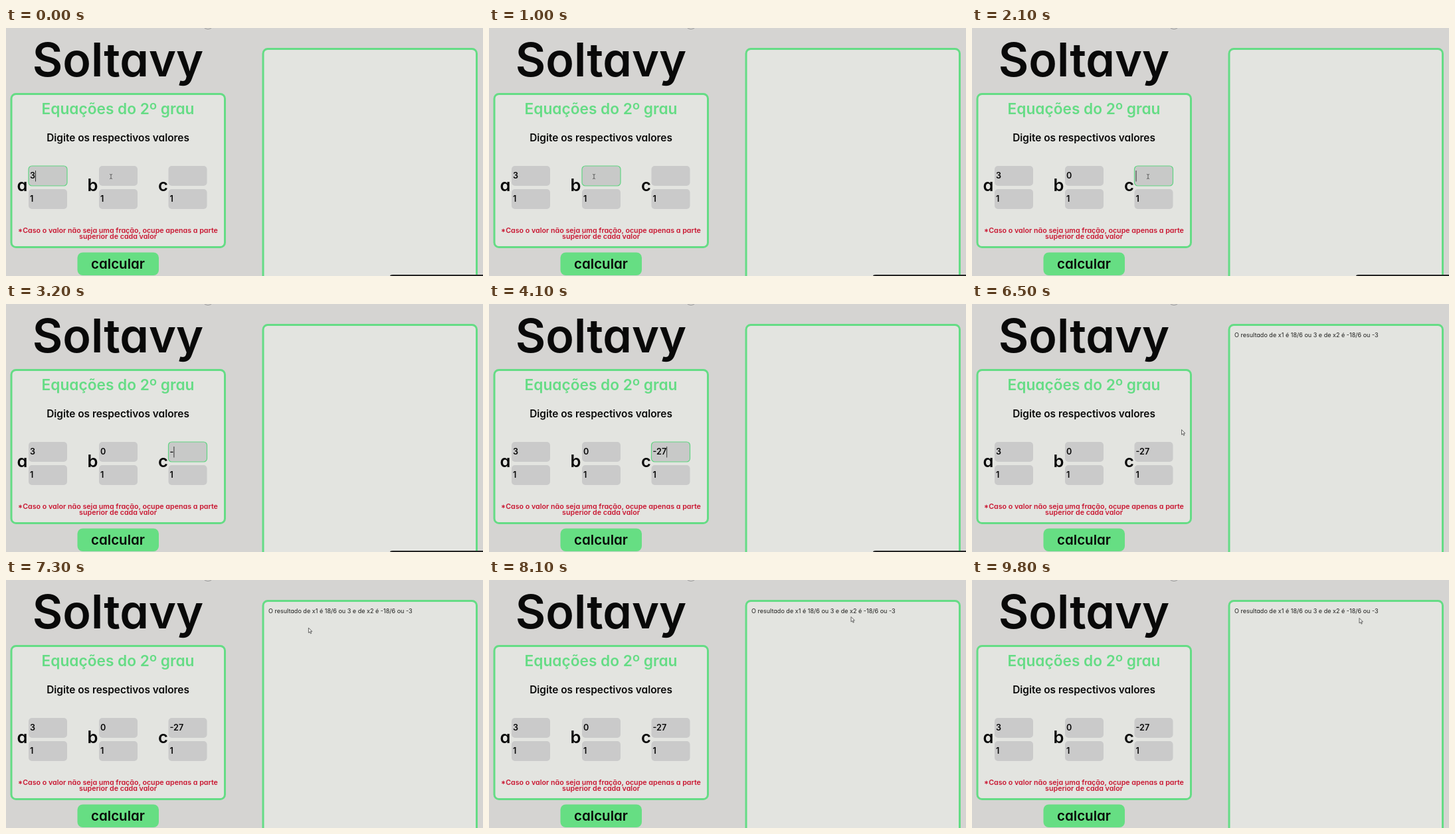
These frames come from a looping animation (718 px wide and 374 px high, 9.9 s). An HTML page:

```html
<!DOCTYPE html>
<html lang="pt">
<head>
<meta charset="utf-8">
<title>Equações do 2º grau</title>
<style>
html, body { margin: 0; width: 100%; height: 100%; overflow: hidden; background: #d5d4d2; }
svg { display: block; width: 718px; height: 374px; }
text { font-family: Inter, "Open Sans", sans-serif; font-weight: 600; font-feature-settings: "cv11"; fill: #090909; white-space: pre; }
.mid { text-anchor: middle; }
.panel { fill: #e3e4e0; stroke: #65dc85; stroke-width: 3; }
.field { fill: #cacaca; }
.focus { fill: #c8c9c8; stroke: #62d583; stroke-width: 1.2; }
.value { font-size: 12.6px; }
.label { font-size: 25.5px; }
.note { font-size: 10.7px; fill: #c91530; }
</style>
</head>
<body>
<svg viewBox="0 0 718 374">
  <rect width="718" height="374" fill="#d5d4d2"/>
  <circle cx="304" cy="-8" r="9.5" fill="#eeeeec" stroke="#8b8a89"/>
  <text class="mid" x="168.5" y="73" font-size="70">Soltavy</text>
  <rect class="panel" x="8" y="99.5" width="321.5" height="231" rx="7"/>
  <rect class="panel" x="387" y="31.5" width="321.5" height="370" rx="7"/>
  <text class="mid" x="168.5" y="130" font-size="22.7" style="fill:#65dc85">Equações do 2º grau</text>
  <text class="mid" x="168.5" y="171" font-size="15.4">Digite os respectivos valores</text>
  <g id="form"></g>
  <text class="mid note" x="168.5" y="309.3">*Caso o valor não seja uma fração, ocupe apenas a parte</text>
  <text class="mid note" x="168.5" y="317.8">superior de cada valor</text>
  <rect x="107.5" y="338.5" width="122.5" height="34.5" rx="8" fill="#66de83"/>
  <text class="mid" x="168.5" y="363" font-size="20.5">calcular</text>
  <text id="result" x="395" y="50" font-size="9.05" style="font-weight:400;fill:#20201f">O resultado de x1 é 18/6 ou 3 e de x2 é -18/6 ou -3</text>
  <path id="bar" d="M578 374Q578 372 582 372H718V374Z" fill="#252525"/>
  <path id="caret" stroke="#333" stroke-width="1"/>
  <path id="ibeam" d="M-2 -3.5Q0 -3.5 0 -2Q0 -3.5 2 -3.5M0 -2V2M-2 3.5Q0 3.5 0 2Q0 3.5 2 3.5" fill="none" stroke="#555" stroke-width=".9"/>
  <path id="hand" d="M-1 -4Q0 -5 .7 -4V-1L3.5 0Q4.2 1 3.4 4H-1.5L-3.5 1Q-3 0 -1 1Z" fill="#e5e6e3" stroke="#4b604f" stroke-width=".7"/>
  <path id="arrow" d="M0 0V7.6L1.8 6L3 8.8L4.3 8.2L3.1 5.5H5.4Z" fill="#f2f2f0" stroke="#444" stroke-width=".8"/>
</svg>
<script>
const LOOP = 9900, STEP = 100;
const $ = id => document.getElementById(id);
const show = (el, on) => el.setAttribute('visibility', on ? 'visible' : 'hidden');

function add(name, attrs, text = '') {
  const el = document.createElementNS('http://www.w3.org/2000/svg', name);
  for (const key in attrs) el.setAttribute(key, attrs[key]);
  el.textContent = text;
  $('form').append(el);
  return el;
}

const field = (x, y) => add('rect', { class: 'field', x, y, width: 58, height: 30, rx: 5 });
const fields = [['a', 34, 16.5], ['b', 140, 122.5], ['c', 244.5, 229]].map(([name, x, labelX]) => {
  add('text', { class: 'label', x: labelX, y: 246 }, name);
  const box = field(x, 208);
  field(x, 243);
  add('text', { class: 'value', x: x + 2, y: 262 }, '1');
  return { x, box, value: add('text', { class: 'value', x: x + 2, y: 227 }) };
});

// [time, focused field, values]
const states = [
  [0, 0, ['3', '', '']],
  [500, 1, ['3', '', '']],
  [1100, 1, ['3', '0', '']],
  [2000, 2, ['3', '0', '']],
  [3200, 2, ['3', '0', '-']],
  [3600, 2, ['3', '0', '-2']],
  [3900, 2, ['3', '0', '-27']],
  [5800, -1, ['3', '0', '-27']]
];

// [time, x, y] of the pointer
const route = [
  [0, 158, 224], [1400, 158, 224], [1900, 265, 224], [4500, 265, 224],
  [5300, 175, 351], [6000, 175, 351], [6500, 315.5, 189.5], [7100, 445, 74],
  [8100, 545, 55.5], [9000, 598, 58.5], [9200, 598, 58.5], [9800, 583, 57.5], [LOOP, 583, 57.5]
];
const between = (v, lo, hi) => v >= lo && v < hi;

function pointerAt(t) {
  const i = route.findIndex((p, k) => k && t <= p[0]);
  const [t0, x0, y0] = route[i - 1], [t1, x1, y1] = route[i];
  const u = (t - t0) / (t1 - t0), e = u * u * (3 - 2 * u);
  return [x0 + (x1 - x0) * e, y0 + (y1 - y0) * e];
}

function drawPointer(t) {
  const [x, y] = pointerAt(t);
  const inField = between(y, 208, 273) && fields.some(f => between(x, f.x, f.x + 58));
  const onButton = between(x, 107, 230) && between(y, 338, 373);
  const kind = inField ? 'ibeam' : onButton ? 'hand' : 'arrow';
  const typing = between(t, 1100, 1400) || between(t, 3200, 4500);
  for (const id of ['ibeam', 'hand', 'arrow']) {
    $(id).setAttribute('transform', `translate(${x} ${y})`);
    show($(id), id === kind && !typing);
  }
}

function draw(t) {
  const [since, focus, values] = states.filter(s => s[0] <= t).pop();
  fields.forEach((f, i) => {
    f.value.textContent = values[i];
    f.box.setAttribute('class', i === focus ? 'focus' : 'field');
  });
  const caretOn = focus >= 0 && (t - since) % 1000 < 500;
  show($('caret'), caretOn);
  if (caretOn) {
    const f = fields[focus];
    const width = values[focus] ? f.value.getComputedTextLength() : 0;
    $('caret').setAttribute('d', `M${f.x + 2.5 + width} 215V231.5`);
  }
  show($('result'), t >= 5800);
  show($('bar'), t < 6100);
  drawPointer(t);
}

function tick() {
  const t = performance.now() % LOOP;
  draw(Math.floor(t / STEP) * STEP);
  requestAnimationFrame(tick);
}
tick();
</script>
</body>
</html>
```
